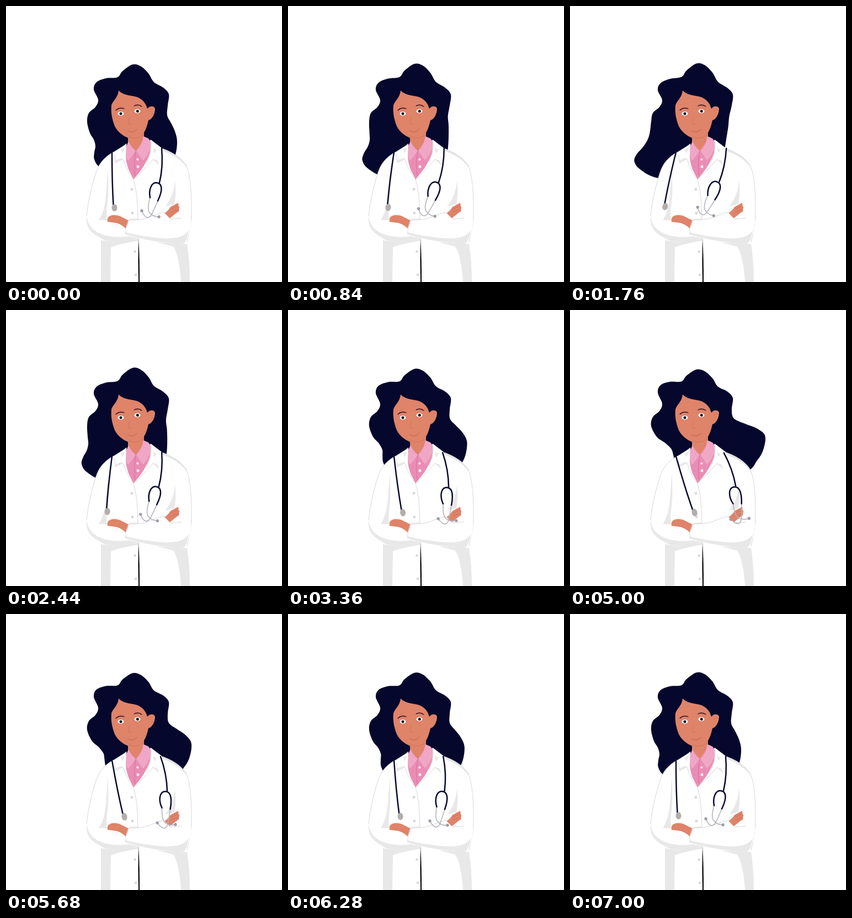
An HTML page that plays this animation: 500 by 500 pixels, repeating every 7.2 s.

```html
<!DOCTYPE html>
<html lang="en">
<head>
<meta charset="utf-8">
<title>Doctor</title>
<style>
  html, body { margin: 0; width: 100%; height: 100%; overflow: hidden; background: #fff; }
  svg { display: block; width: 100vw; height: 100vh; }
  .skin { fill: #df8369; }
  .shade { fill: #e8e8e8; }
  .line { fill: none; stroke: #d8d8d8; stroke-width: 1; stroke-linecap: round; stroke-linejoin: round; }
  .crease { fill: none; stroke: #c0654f; stroke-width: 1; stroke-linecap: round; }
  .brow { fill: none; stroke: #2a1220; stroke-width: 1.3; stroke-linecap: round; }
  .tube { fill: none; stroke: #07082f; stroke-width: 2.5; stroke-linecap: round; }
  .metal { fill: none; stroke: #b4b4bc; stroke-width: 1.6; stroke-linecap: round; }
</style>
</head>
<body>
<svg viewBox="0 0 500 500">
  <path id="hair" fill="#05072c"/>

  <g id="head">
    <path class="skin" d="M221 230L221 250L235 264L250 250L250 222Z"/>
    <path class="skin" d="M204 153C211 161 224 162 234 164C246 167 253 175 256 186C260 181 268 180 270 186C270 196 264 206 258 207C256 216 253 225 249 231C245 238 236 242 228 241C214 238 199 227 195 212C191 200 190 190 191 180C193 172 203 166 204 153Z"/>
    <path class="crease" d="M222 236Q236 244 249 233" opacity=".5"/>
    <path class="crease" d="M224 202Q220 211 222 213Q224 215 227 213" opacity=".5"/>
    <path class="crease" d="M220 226Q230 232 238 223"/>
    <path class="crease" d="M260 192Q263 186 267 186" opacity=".4"/>
    <path class="brow" d="M199 189Q205 183 214 186M232 181Q239 177 246 182"/>
    <ellipse cx="208" cy="195" rx="5.500" ry="3.700" fill="#fff"/>
    <ellipse cx="238" cy="190.500" rx="5.500" ry="3.700" fill="#fff"/>
    <circle cx="208" cy="195" r="2.500" fill="#080820"/>
    <circle cx="238.300" cy="190.500" r="2.500" fill="#080820"/>
  </g>

  <g id="coat">
    <path fill="#fff" d="M218 250L194 265C176 275 168 287 163 302C154 330 149 354 146 380C145 398 150 407 172 424L172 500H333L328 427C336 410 337 390 336 360C336 335 334 315 329 295C324 279 305 268 284 259L262 242L231 314Z"/>
    <path class="shade" d="M172 424Q195 430 241 421L241 425Q205 431 190 437L189 500H172Z"/>
    <path class="shade" d="M272 428L328 431Q333 462 333 500H317Q314 452 303 436Q290 432 272 428Z"/>
    <path class="shade" d="M184 294Q187 330 184 356Q181 372 183 388L168 388Q178 372 180 352Q183 326 184 294Z"/>
    <path class="shade" d="M146 380C148 399 160 412 187 417Q205 420 222 417L241 421Q205 430 180 425C155 412 144 404 146 380Z"/>
    <path class="shade" d="M284 258Q321 272 329 295Q314 273 284 263Z"/>
    <path class="line" d="M194 265C176 275 168 287 163 302C154 330 149 354 146 380M284 259C305 268 324 279 329 295C334 315 336 335 336 370Q336 400 328 427"/>
    <path class="shade" d="M306 316Q304 345 288 363L305 359Q309 340 306 316Z"/>
    <path class="line" d="M231 314Q237 335 238 360L239 386"/>
    <path fill="#050508" d="M240 421Q238.800 460 240 500H242Q242.300 455 240 421Z"/>
  </g>

  <g id="shirt">
    <path fill="#ea8db4" d="M222 246L217 255Q215 280 219 291L231 314Q246 298 256 284Q263 268 264 250L252 238L235 263Z"/>
    <path fill="#f0a7c6" d="M222 245Q217 254 218 276L222 280L235 262Q226 257 222 245ZM249 236L258 240Q265 247 262 256Q258 270 248 280L236 262Q246 255 249 236Z"/>
    <path d="M235 263Q231 283 234 308" fill="none" stroke="#d2729f" stroke-width="1"/>
    <g fill="#fdf0f6">
      <circle cx="238.500" cy="278" r="2"/><circle cx="239" cy="291" r="2.500"/>
    </g>
  </g>

  <g id="lapels">
    <path fill="#fff" d="M218 249L197 267L198 283L212 277Q217 296 231 314Q219 295 217 275ZM263 243L283 258L277 286L266 278Q250 298 231 314Q253 290 261 266Z"/>
    <path class="line" d="M197 269L198 283L212 277Q217 296 231 314M263 246Q264 264 256 282M277 286L266 278Q250 298 231 314"/>
    <path class="shade" d="M208 260L211 267L216 256ZM266 257L268 267L273 261ZM197 280L198 285L212 278L209 275ZM266 277L277 288L275 280Z"/>
  </g>

  <g fill="#d9d9dc">
    <circle cx="228" cy="332" r="2.500"/><circle cx="229" cy="375" r="2.500"/>
    <circle cx="233.500" cy="445" r="2.300"/><circle cx="235" cy="487" r="2.300"/>
  </g>

  <g id="arms">
    <path class="skin" d="M184 391Q182 381 192 379Q202 378 209 382L223 389L217 403Q210 396 200 393Z"/>
    <path class="skin" d="M286 376Q293 372 298 364L311 357Q314 358 312 362Q316 364 313 368Q315 372 310 374L296 385Z"/>
    <path class="crease" d="M299 368L312 362M300 373L313 368" opacity=".6"/>
    <path fill="#fff" d="M222 388L258 383Q272 376 286 374L298 386L320 384L335 380Q336 415 322 431Q270 426 217 413Z"/>
    <path class="shade" d="M217 410Q250 419 290 421Q322 422 331 406Q328 427 320 431Q262 428 217 414Z"/>
    <path class="line" d="M217 413Q216 400 222 388Q250 388 264 381Q276 375 286 374L298 386L318 384M222 388Q228 385 240 386"/>
  </g>

  <g id="bell">
    <path class="tube" d="M192 266Q192 320 194.500 360"/>
    <ellipse cx="196.500" cy="365.500" rx="5" ry="6.500" fill="#b3adab"/>
  </g>
  <g id="headset">
    <path class="metal" d="M261 347Q255 368 260 374Q266 382 277 382M275 353Q267 372 263 379Q258 386 252 381Q248 377 246 371"/>
    <circle cx="246" cy="371" r="2.700" fill="#9c9daa"/>
    <circle cx="277" cy="382" r="2.700" fill="#9c9daa"/>
    <path class="tube" d="M282 258Q285 291 278 320M261 347C258 332 264 320 272 320C283 321 285 332 275 353"/>
  </g>
</svg>
<script>
  const LOOP = 7200, STEP = 40, LAST = 7000;
  const LEFT_AT = 1500, RIGHT_AT = 4560, REST_AT = 7060;
  const byId = id => document.getElementById(id);
  const mix = (a, b, k) => a + (b - a) * k;
  const clamp = k => Math.max(0, Math.min(1, k));
  const smooth = k => k * k * (3 - 2 * k);
  const ease = (t, from, to) => smooth(clamp((t - from) / (to - from)));

  // Eased swing: rest, left extreme, right extreme, back to rest.
  function swing(t, left, right) {
    if (t < LEFT_AT) return mix(0, left, ease(t, 0, LEFT_AT));
    if (t < RIGHT_AT) return mix(left, right, ease(t, LEFT_AT, RIGHT_AT));
    return mix(right, 0, ease(t, RIGHT_AT, REST_AT));
  }

  // Key points of the resting hair, clockwise from the crown.
  const hair = [
    [229, 106], [244, 109], [258, 122], [268, 138], [285, 148], [295, 160],
    [293, 180], [292, 198], [299, 212], [306, 227], [310, 245], [307, 269], [297, 288],
    [275, 308], [200, 305], [170, 292], [160, 278], [160, 265], [162, 254], [159, 242],
    [152, 230], [147, 210], [150, 194], [162, 183],
    [167, 170], [159, 151], [164, 138], [181, 131], [202, 129], [211, 118]];

  // The crown ripples slightly; lower hair sways more, most on the leading side.
  function sway([x, y], w) {
    const depth = ease(y + 0.2 * x, 242, 312);
    const lead = 1 + 0.18 * w * (x - 235) / 75;
    const ripple = 2 * Math.sin((x - 195) / 27) * (1 - ease(y, 140, 180));
    return [x + 38 * w * depth * lead, y + w * (ripple - 0.1 * (x - 130) * depth)];
  }

  function closedCurve(points) {
    const n = points.length, at = i => points[(i + n) % n];
    const fmt = (x, y) => x.toFixed(2) + " " + y.toFixed(2);
    let d = "M" + fmt(...at(0));
    for (let i = 0; i < n; i++) {
      const [a, b, c, e] = [at(i - 1), at(i), at(i + 1), at(i + 2)];
      d += "C" + fmt(b[0] + (c[0] - a[0]) / 6, b[1] + (c[1] - a[1]) / 6) +
        " " + fmt(c[0] - (e[0] - b[0]) / 6, c[1] - (e[1] - b[1]) / 6) + " " + fmt(...c);
    }
    return d + "Z";
  }

  function hang(id, x, y, angle, stretch) {
    const scale = 1 + Math.max(0, angle) * stretch;
    byId(id).setAttribute("transform",
      `translate(${x} ${y}) rotate(${-angle}) scale(1 ${scale}) translate(${-x} ${-y})`);
  }

  function draw(time) {
    const t = Math.min(Math.floor(time % LOOP / STEP) * STEP, LAST);
    const wind = swing(t, -1.02, 1.07);
    byId("hair").setAttribute("d", closedCurve(hair.map(point => sway(point, wind))));
    hang("bell", 193, 265, swing(t, -14.5, 17.3), 0.004);
    hang("headset", 283, 266, swing(t, -9, 25.3), 0.001);
  }

  const start = performance.now();
  function tick() {
    draw(performance.now() - start);
    requestAnimationFrame(tick);
  }
  tick();
</script>
</body>
</html>
```
